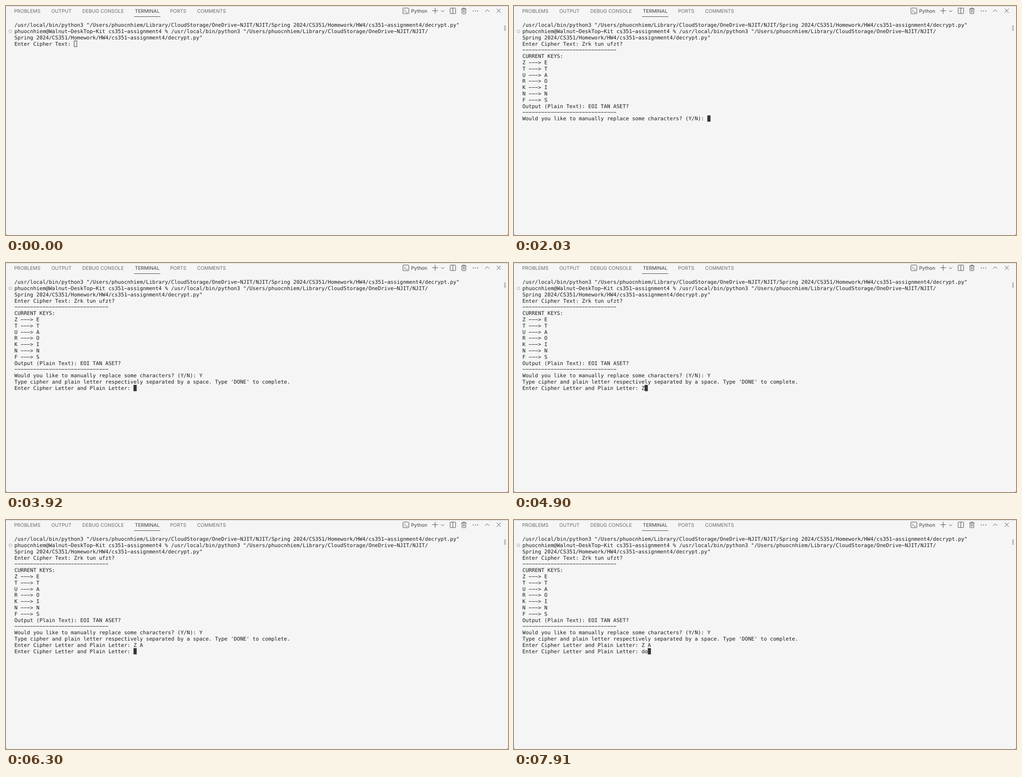
An HTML page for the animation above (8 s loop, 1106 by 507 pixels).

```html
<!DOCTYPE html>
<html lang="en">
<head>
<meta charset="utf-8">
<title>Terminal session</title>
<style>
  html, body { margin: 0; width: 100%; height: 100%; overflow: hidden; background: #f5f5f5; }
  svg { display: block; width: 1106px; height: 507px; }
  text { white-space: pre; text-rendering: geometricPrecision; }
  .tabs { font: 10.7px Inter, "Liberation Sans", sans-serif; fill: #6b6b6b; }
  .tabs .active { fill: #3c3c3c; }
  .term { font: 11.47px "DejaVu Sans Mono", "Liberation Mono", monospace; fill: #1c1c1c; }
  .icons { fill: none; stroke: #484848; stroke-width: 1; }
  .icons .dot { fill: #484848; stroke: none; }
</style>
</head>
<body>
<svg viewBox="0 0 1106 507">
  <rect width="1106" height="507" fill="#555"/>
  <path d="M0 0H1106V505l-2 2H2l-2-2z" fill="#f5f5f5"/>
  <rect width="1106" height="1" fill="#d2d2d2"/>
  <g class="tabs">
    <text x="18" y="14.7">PROBLEMS</text>
    <text x="99.7" y="14.7">OUTPUT</text>
    <text x="168" y="14.7">DEBUG CONSOLE</text>
    <text x="284" y="14.7" class="active">TERMINAL</text>
    <text x="361.4" y="14.7">PORTS</text>
    <text x="421" y="14.7">COMMENTS</text>
    <text x="892.5" y="14.7" class="active">Python</text>
  </g>
  <rect x="282" y="23" width="58" height="1" fill="#4a4a4a"/>
  <g class="icons">
    <rect x="874.5" y="4.5" width="13" height="12.5" rx="1"/>
    <path d="M877 7.5l3 3-3 3M881 14h4"/>
    <path d="M939 10.5h13M945.5 4v13"/>
    <path d="M958.5 9.5l3.5 3.5 3.5-3.5"/>
    <rect x="978.4" y="4.6" width="12.2" height="12.2" rx="1"/>
    <path d="M984.5 4.5v12"/>
    <path d="M1003 6.5h11.5M1006.5 6.5v-2h4.5v2M1004.5 6.5v9.5q0 1 1 1h6.500q1 0 1-1v-9.5M1007.5 8.5v6M1010 8.5v6"/>
    <circle class="dot" cx="1029.5" cy="11" r="1"/>
    <circle class="dot" cx="1034.5" cy="11" r="1"/>
    <circle class="dot" cx="1039.5" cy="11" r="1"/>
    <path d="M1055.5 12.8l4.6-4.6 4.6 4.6"/>
    <path d="M1081.2 6.2l8.6 8.6M1089.8 6.2l-8.6 8.6"/>
  </g>
  <circle cx="9.6" cy="56" r="3.2" fill="none" stroke="#a3a3a3"/>
  <rect x="1097.5" y="43" width="3.5" height="12" fill="#bdbdbd"/>
  <g class="term" id="term"></g>
  <rect id="cursor" stroke="#333"/>
</svg>
<script>
const LOOP = 8000, LEFT = 18.5, TOP = 35.3, COL = 6.905, ROW = 13.8, BASE = 10.9;
const user = "phuocnhiem", host = "Walnut-DeskTop-Kit";
const folder = `/Users/${user}/Library/CloudStorage/OneDrive-NJIT/NJIT/`;
const script = 'Spring 2024/CS351/Homework/HW4/cs351-assignment4/decrypt.py"';
const run = `/usr/local/bin/python3 "${folder}`;
const rule = "-".repeat(30);
const askLetters = "Enter Cipher Letter and Plain Letter: ";

const intro = [run + script, `${user}@${host} cs351-assignment4 % ${run}`, script];
const askText = "Enter Cipher Text: ", cipher = "Zrk tun ufzt?";
const keys = ["ZE", "TT", "UA", "RO", "KI", "NN", "FS"].map(([a, b]) => `${a} ---> ${b}`);
const result = [...intro, askText + cipher, rule, "CURRENT KEYS:", ...keys,
  "Output (Plain Text): EOI TAN ASET?", rule];
const askReplace = "Would you like to manually replace some characters? (Y/N): ";
const editing = [...result, askReplace + "Y",
  "Type cipher and plain letter respectively separated by a space. Type 'DONE' to complete."];
const second = [...editing, askLetters + "Z A"];

// start time, finished lines, line with the cursor
const steps = [
  [0, intro, askText],
  [1260, intro, askText + cipher],
  [2030, result, askReplace],
  [3430, result, askReplace + "Y"],
  [3920, editing, askLetters],
  [4900, editing, askLetters + "Z"],
  [5110, editing, askLetters + "Z "],
  [5320, editing, askLetters + "Z A"],
  [6230, second, askLetters],
  [7840, second, askLetters + "d"],
  [7910, second, askLetters + "do"],
];
const FOCUS = 280;

const term = document.getElementById("term");
const cursor = document.getElementById("cursor");
const rows = Array.from({ length: second.length + 1 }, (_, i) => {
  const row = document.createElementNS("http://www.w3.org/2000/svg", "text");
  setAttrs(row, { x: LEFT, y: TOP + i * ROW + BASE });
  return term.appendChild(row);
});

function setAttrs(el, attrs) {
  for (const name in attrs) el.setAttribute(name, attrs[name]);
}

// the terminal face has wide hyphens
const widen = s => s.replace(/-/g, "\u2212");

let shown = -1;
function draw(t) {
  const index = steps.findLastIndex(step => step[0] <= t);
  const [, done, line] = steps[index];
  if (index !== shown) {
    const lines = [...done, line];
    rows.forEach((row, i) => { row.textContent = widen(lines[i] || ""); });
    setAttrs(cursor, {
      x: LEFT + line.length * COL + 0.5, y: TOP + done.length * ROW + 0.5,
      width: COL - 1, height: ROW - 1,
    });
    shown = index;
  }
  cursor.setAttribute("fill", t < FOCUS ? "none" : "#333");
}

const start = performance.now();
function tick() {
  draw((performance.now() - start) % LOOP);
  requestAnimationFrame(tick);
}
tick();
</script>
</body>
</html>
```
